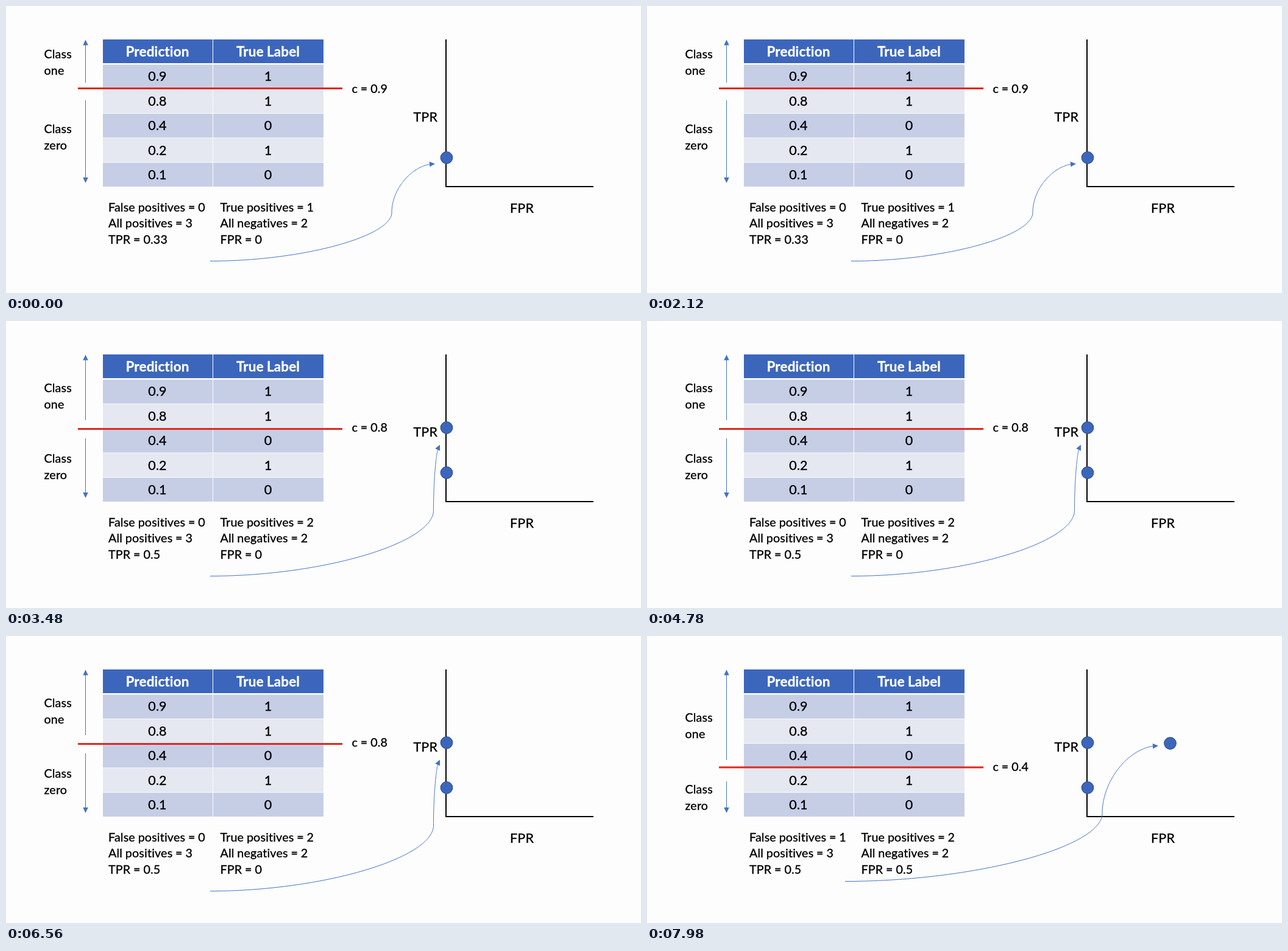
An HTML page with a canvas for the animation above (8000 ms loop, 1042 px wide and 472 px high).

```html
<!DOCTYPE html>
<html lang="en">
<head>
<meta charset="utf-8">
<title>Building a ROC curve</title>
<style>
  html, body { margin: 0; width: 100%; height: 100%; overflow: hidden; background: #fdfdfd; }
  canvas { display: block; }
</style>
</head>
<body>
<canvas id="stage" width="1042" height="472"></canvas>
<script>
const ctx = document.getElementById('stage').getContext('2d');
const LOOP = 8000;
const SMALL = 19.7, LARGE = 21.5, HEADING = 22.4;
const PAPER = '#fdfdfd', BLUE = '#3c66bc', EDGE = '#2f528f', LINE = '#4472c4';

const rows = [['0.9', 1], ['0.8', 1], ['0.4', 0], ['0.2', 1], ['0.1', 0]];
const dots = [[723, 249.5], [723, 175.5], [858.5, 176.5]];

// Each slide: threshold line, class labels, arrow ends, and the connector's start, bend and tip.
const slides = [
  { from: 0, cut: '0.9', cutY: 135.5, cutText: 143, one: 86, zero: 209, upEnd: 126, downStart: 155,
    fp: 0, tp: 1, tpr: '0.33', fpr: '0', start: [335, 419.5], bend: 633, tip: [704, 259.5] },
  { from: 3470, cut: '0.8', cutY: 177.5, cutText: 182, one: 117, zero: 233, upEnd: 163, downStart: 193,
    fp: 0, tp: 2, tpr: '0.5', fpr: '0', start: [335, 419.5], bend: 701.5, tip: [712, 203.5] },
  { from: 6970, cut: '0.4', cutY: 216, cutText: 222, one: 141, zero: 259, upEnd: 204, downStart: 239,
    fp: 1, tp: 2, tpr: '0.5', fpr: '0.5', start: [325, 403.5], bend: 747, tip: [839, 180.5] }
];

function text(str, x, y, size = SMALL, color = '#000', align = 'left', weight = 400) {
  ctx.font = `${weight} ${size}px Lato, sans-serif`;
  ctx.letterSpacing = size * 0.008 + 'px'; // any tracking also turns ligatures off
  ctx.wordSpacing = size * -0.02 + 'px';
  ctx.textAlign = align;
  ctx.fillStyle = ctx.strokeStyle = color;
  ctx.lineWidth = 0.35;
  ctx.fillText(str, x, y);
  ctx.strokeText(str, x, y);
}

function rect(x, y, w, h, color) {
  ctx.fillStyle = color;
  ctx.fillRect(x, y, w, h);
}

function stroke(points, color, width) {
  ctx.beginPath();
  points.forEach(([x, y]) => ctx.lineTo(x, y));
  ctx.strokeStyle = color;
  ctx.lineWidth = width;
  ctx.stroke();
}

function arrowHead([x, y], angle) {
  ctx.save();
  ctx.translate(x, y);
  ctx.rotate(angle);
  ctx.beginPath();
  ctx.moveTo(0, 0);
  ctx.lineTo(-9, -4.3);
  ctx.lineTo(-9, 4.3);
  ctx.closePath();
  ctx.fillStyle = LINE;
  ctx.fill();
  ctx.restore();
}

function arrow(x, y1, y2) {
  const dir = Math.sign(y2 - y1);
  stroke([[x, y1], [x, y2 - dir * 6]], LINE, 1);
  arrowHead([x, y2], dir * Math.PI / 2);
}

function cubic(p, t) {
  const u = 1 - t;
  return [0, 1].map(i =>
    u * u * u * p[0][i] + 3 * u * u * t * p[1][i] + 3 * u * t * t * p[2][i] + t * t * t * p[3][i]);
}

function connector([x1, y1], bend, [x2, y2]) {
  const mid = (y1 + y2) / 2;
  const first = [[x1, y1], [(x1 + bend) / 2, y1], [bend, (y1 + mid) / 2], [bend, mid]];
  const second = [[bend, mid], [bend, (mid + y2) / 2], [(bend + x2) / 2, y2], [x2, y2]];
  // Step back from the tip until the curve is one head length away.
  let t = 1, base;
  do {
    t -= 0.005;
    base = cubic(second, t);
  } while (Math.hypot(x2 - base[0], y2 - base[1]) < 8 && t > 0);
  const points = [];
  for (let i = 0; i <= 80; i++) points.push(cubic(first, i / 80));
  for (let i = 1; i <= 80; i++) points.push(cubic(second, t * i / 80));
  stroke(points, LINE, 1);
  arrowHead([x2, y2], Math.atan2(y2 - base[1], x2 - base[0]));
}

function table() {
  rect(159, 55, 362, 39, BLUE);
  text('Prediction', 248.5, 83, HEADING, '#fff', 'center', 700);
  text('True Label', 430, 83, HEADING, '#fff', 'center', 700);
  rows.forEach(([score, label], i) => {
    const y = 96.5 + i * 40.3;
    rect(159, y, 362, 39.3, i % 2 ? '#e5e7f1' : '#c6cee6');
    const base = 123 + i * 40.5;
    text(score, 248.5, base, LARGE, '#000', 'center');
    text(label, 430, base, LARGE, '#000', 'center');
  });
  rect(339, 55, 1, 243, PAPER);
}

function chart(count) {
  stroke([[722, 55], [722, 297], [964, 297]], '#000', 2);
  text('TPR', 668.5, 190, LARGE);
  text('FPR', 827, 340, LARGE);
  dots.slice(0, count).forEach(([x, y]) => {
    ctx.beginPath();
    ctx.arc(x, y, 9.8, 0, 2 * Math.PI);
    ctx.fillStyle = BLUE;
    ctx.fill();
    ctx.strokeStyle = EDGE;
    ctx.lineWidth = 1.2;
    ctx.stroke();
  });
}

function lines(list, x, y) {
  list.forEach((str, i) => text(str, x, y + i * 26.5));
}

function draw(now) {
  const time = now % LOOP;
  const index = slides.findLastIndex(s => time >= s.from);
  const s = slides[index];
  rect(0, 0, 1042, 472, PAPER);
  table();
  lines(['Class', 'one'], 62.5, s.one);
  lines(['Class', 'zero'], 62.5, s.zero);
  arrow(130.5, s.upEnd, 55.5);
  arrow(130.5, s.downStart, 291);
  stroke([[118, s.cutY], [552, s.cutY]], '#dc2a1e', 3);
  text('c = ' + s.cut, 567.5, s.cutText);
  lines(['False positives = ' + s.fp, 'All positives = 3', 'TPR = ' + s.tpr], 168, 337.5);
  lines(['True positives = ' + s.tp, 'All negatives = 2', 'FPR = ' + s.fpr], 351.5, 337.5);
  chart(index + 1);
  connector(s.start, s.bend, s.tip);
}

const origin = performance.now();
function tick() {
  draw(performance.now() - origin);
  requestAnimationFrame(tick);
}
tick();
</script>
</body>
</html>
```
